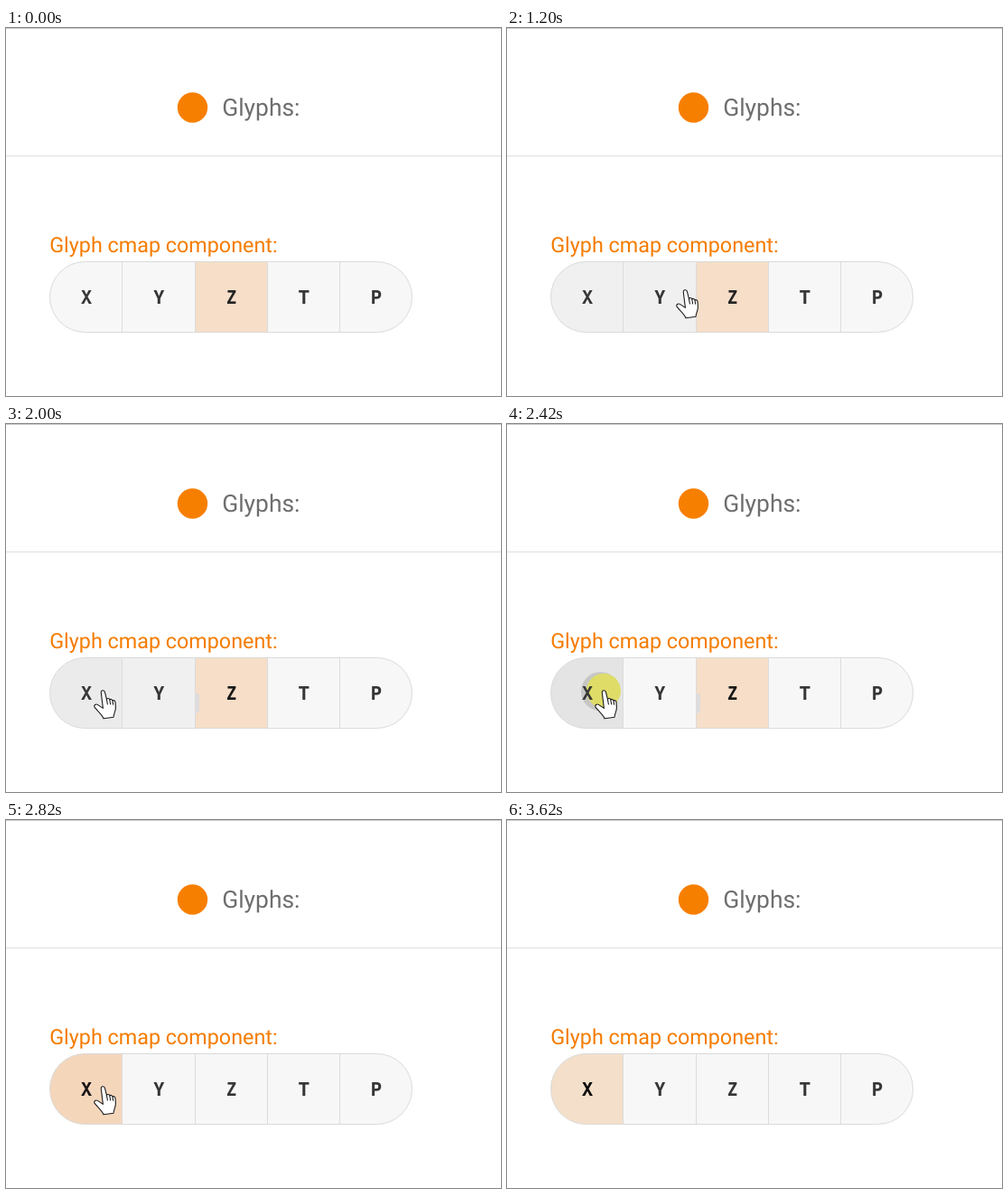
These frames come from a looping animation (548x407 px, 4.02 s). An HTML page:

```html
<!DOCTYPE html>
<html lang="en">
<head>
<meta charset="utf-8">
<title>Segmented buttons</title>
<style>
  html, body { margin: 0; width: 100%; height: 100%; overflow: hidden; background: #fff; }
  svg { display: block; }
  text { font-family: Roboto, sans-serif; text-rendering: geometricPrecision; }
  #letters text { font: 700 21px "Noto Sans Mono", monospace; font-stretch: condensed; text-anchor: middle; }
</style>
</head>
<body>
<svg width="548" height="407" viewBox="0 0 548 407">
  <clipPath id="pill"><rect x="48.5" y="258.5" width="401" height="78" rx="39"/></clipPath>
  <path d="M0 .5H548" stroke="#c8c8c8"/>
  <path d="M0 141.5H548" stroke="#dedede"/>
  <circle cx="206.5" cy="88" r="16.7" fill="#f77f00"/>
  <text x="239.2" y="97" font-size="26.4" fill="#6e6e70">Glyphs:</text>
  <text x="48.2" y="248" font-size="23.33" fill="#f57c00">Glyph cmap component:</text>

  <g clip-path="url(#pill)">
    <g id="cells"></g>
    <path id="smudge" d="M210 298h2q2 0 2 3v13q0 6-4 6z" fill="#dddcdd"/>
    <circle class="press" cx="103.5" cy="295.7" r="21.5" fill="#c6c6c4"/>
  </g>
  <circle class="press" cx="107" cy="295" r="19" fill="#dfdd68"/>
  <path d="M128.5 259V336M209.5 259V336M289.5 259V336M369.5 259V336" stroke="#dcdcdc"/>
  <rect x="48.5" y="258.5" width="401" height="78" rx="39" fill="none" stroke="#dadada"/>
  <g id="letters"></g>

  <g id="cursor" fill="#fff" stroke="#1c1c1c" stroke-width="1.1" stroke-linejoin="round" stroke-linecap="round">
    <path d="M8.3 3.2C7.8 .4 11.6 -.2 12.4 2.4L14.4 10.4C15.2 9 17.4 9.2 17.8 11C18.6 9.9 20.6 10.2 21 12C21.8 11.2 23.6 11.6 24 13.6L24.4 19.4C24.4 23.4 22.6 25.4 22 30.2L11 31.8C10 28 5 24.2 1 19.2C-.2 17 2.4 15.2 4.4 16.4L10.4 20.4Z"/>
    <path d="M14.4 10.4L15.4 16M17.8 11L18.6 16M21 12L21.6 16.2" fill="none"/>
  </g>
</svg>
<script>
const LOOP = 4020;
const IDLE = '#f7f7f7', HOVER = '#e8e8e8', HALF = '#f0f0f0', PICKED = '#f6dec8', INK = '#363636';

// start time, cursor position, fills of the X Y Z cells, ink of X and Z
const steps = [
  [0,    null,       IDLE,      IDLE,      PICKED,    INK,       '#242424'],
  [200,  [94, 301],  IDLE,      IDLE,      PICKED,    INK,       '#242424'],
  [400,  [79, 291],  '#eaeaea', IDLE,      PICKED,    INK,       '#242424'],
  [600,  [77, 289],  HOVER,     IDLE,      PICKED,    INK,       '#242424'],
  [1200, [187, 289], HALF,      HALF,      PICKED,    INK,       '#242424'],
  [1400, [190, 289], IDLE,      HOVER,     PICKED,    INK,       '#242424'],
  [1600, [226, 290], IDLE,      '#ededed', PICKED,    INK,       '#242424'],
  [1800, [140, 294], IDLE,      HOVER,     PICKED,    INK,       '#181818'],
  [2000, [97, 294],  '#ebebeb', HALF,      PICKED,    INK,       '#181818'],
  [2420, [97, 294],  '#e4e4e4', IDLE,      PICKED,    INK,       '#181818'],
  [2620, [97, 294],  '#f8d0ab', IDLE,      '#dadad8', '#5a4634', '#242424'],
  [2820, [97, 294],  '#f4d6bb', IDLE,      IDLE,      '#181414', INK],
  [3020, [97, 294],  '#f3dfca', IDLE,      IDLE,      '#050505', INK],
  [3420, [312, 399], '#f3dfca', IDLE,      IDLE,      '#050505', INK],
  [3620, null,       '#f3dfca', IDLE,      IDLE,      '#050505', INK],
];

const find = id => document.getElementById(id);
function add(parent, tag, attrs, text = '') {
  const el = document.createElementNS('http://www.w3.org/2000/svg', tag);
  for (const key in attrs) el.setAttribute(key, attrs[key]);
  el.textContent = text;
  return find(parent).appendChild(el);
}
const show = (el, on) => el.setAttribute('visibility', on ? 'visible' : 'hidden');

const edges = [48, 128.5, 209.5, 289.5, 369.5, 450];
const cells = [], letters = [];
[...'XYZTP'].forEach((letter, i) => {
  cells.push(add('cells', 'rect', { x: edges[i], y: 258, width: edges[i + 1] - edges[i], height: 79, fill: IDLE }));
  letters.push(add('letters', 'text', { x: 89.1 + 80.2 * i, y: 304.6, fill: INK }, letter));
});

function draw() {
  const now = performance.now() % LOOP;
  const [start, cursor, x, y, z, inkX, inkZ] = steps.findLast(step => step[0] <= now);
  [x, y, z].forEach((fill, i) => cells[i].setAttribute('fill', fill));
  letters[0].setAttribute('fill', inkX);
  letters[2].setAttribute('fill', inkZ);
  show(find('cursor'), cursor);
  if (cursor) find('cursor').setAttribute('transform', `translate(${cursor})`);
  show(find('smudge'), start >= 1600 && start < 2620);
  document.querySelectorAll('.press').forEach(el => show(el, start === 2420));
  requestAnimationFrame(draw);
}
draw();
</script>
</body>
</html>
```
